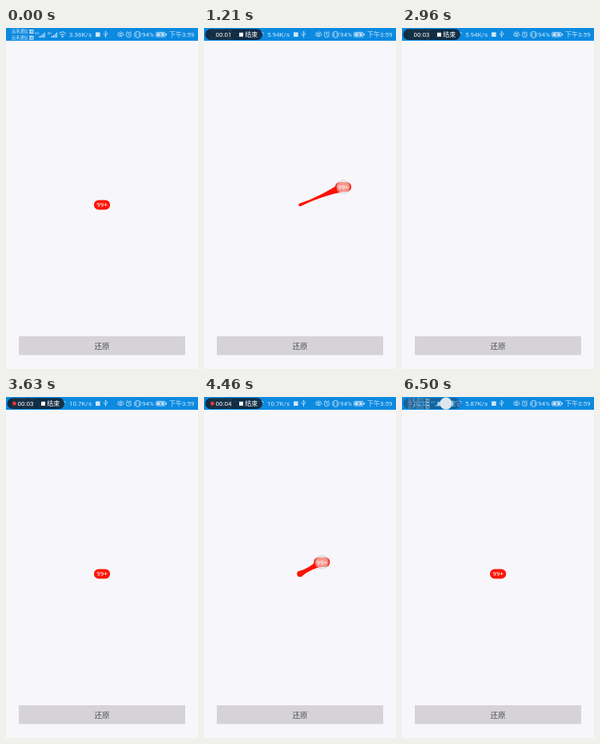
An HTML page for the animation above (6530 ms loop, 240 px wide and 427 px high).

```html
<!DOCTYPE html>
<html lang="zh-CN">
<head>
<meta charset="utf-8">
<title>Badge drag</title>
<style>
html, body { margin: 0; width: 100%; height: 100%; overflow: hidden; background: #f7f6fa; }
svg { display: block; width: 240px; height: 427px; }
text { font-family: Roboto, "Noto Sans CJK SC", "Noto Sans CJK", sans-serif; font-size: 8px; }
</style>
</head>
<body>
<svg viewBox="0 0 240 427" xmlns="http://www.w3.org/2000/svg">
  <defs>
    <radialGradient id="glow">
      <stop offset="0" stop-color="#fff" stop-opacity=".62"/>
      <stop offset=".72" stop-color="#f2f0f0" stop-opacity=".56"/>
      <stop offset=".88" stop-color="#d0cccc" stop-opacity=".6"/>
      <stop offset="1" stop-color="#a8a4a4" stop-opacity=".2"/>
    </radialGradient>
    <path id="bars" d="M0 8h1.2V6H0zM2 8h1.2V5H2zM4 8h1.2V3.5H4zM6 8h1.2V1.8H6z"/>
    <g id="hd">
      <rect width="5.6" height="5" rx=".8" fill="#cfe6f8"/>
      <text x="2.8" y="4" text-anchor="middle" fill="#0c8ae0" style="font-size:3.6px;font-weight:bold">HD</text>
    </g>
  </defs>
  <rect width="240" height="427" fill="#f7f6fa"/>
  <rect width="240" height="16" fill="#0c8ae0"/>

  <g fill="#cfe6f8">
    <text x="7" y="6.4" style="font-size:5.2px">远禾通信</text>
    <text x="7" y="14.2" style="font-size:5.2px">远禾通信</text>
    <use href="#hd" x="29" y="2"/>
    <use href="#hd" x="29" y="9.8"/>
    <text x="36" y="8" style="font-size:4.4px">4G</text>
    <use href="#bars" x="41.5" y="4"/>
    <text x="51.5" y="8" style="font-size:4.4px">4G</text>
    <use href="#bars" x="56.8" y="4"/>
    <g fill="none" stroke="#cfe6f8" stroke-width="1">
      <path d="M66.4 7Q70.6 2.8 74.8 7M68 9Q70.6 6.4 73.2 9"/>
    </g>
    <circle cx="70.6" cy="10.8" r="1.1"/>
    <text id="speed" x="79" y="11.3"></text>
    <rect x="112" y="5.4" width="5.6" height="5.6"/>
    <g fill="none" stroke="#cfe6f8" stroke-width=".8">
      <path d="M124.6 4.4V12M122.6 6.6V8.4L124.6 10M126.6 6V7.8L124.6 9.2M123.8 5.4l.8-1.4.8 1.4"/>
      <path d="M139 8.4Q143.2 3.6 147.4 8.4Q143.2 12.8 139 8.4zM140 5l1 1.2M143.2 3.8v1.2M146.4 5l-1 1.2"/>
      <circle cx="143.2" cy="8.4" r="1.2"/>
      <circle cx="153.4" cy="8.6" r="3"/>
      <path d="M153.4 6.6v2.2l1.4.8M150.2 5.8l1.7-1.5M156.6 5.8l-1.7-1.5"/>
      <rect x="162.4" y="4.6" width="4.2" height="7.4" rx=".5"/>
      <path d="M160.8 5.6v5.4M168.2 5.6v5.4"/>
      <rect x="187.6" y="5.4" width="11.4" height="5.6" rx="1"/>
    </g>
    <rect x="188.6" y="6.4" width="9" height="3.6"/>
    <rect x="199.6" y="7" width="1.3" height="2.4"/>
    <path d="M191 8.6l2.8-1.8-.4 1.3h2.2l-2.8 1.8.4-1.3z" fill="#0c8ae0"/>
    <text x="170" y="11.3">94%</text>
    <text x="204" y="11.3">下午3:59</text>
  </g>

  <g id="pill">
    <rect x="1.5" y="1.3" width="71.5" height="13.8" rx="6.9" fill="#10202f" fill-opacity=".87"/>
    <circle id="dot" cx="10.5" cy="8.2" r="2.4" fill="#f03a30"/>
    <g fill="#fff">
      <text id="clock" x="14.5" y="11.2"></text>
      <rect x="44" y="5.8" width="5" height="5"/>
      <text x="51.2" y="11.2">结束</text>
    </g>
  </g>

  <rect x="16" y="386" width="208" height="23.5" fill="#d5d3d6"/>
  <text x="120" y="401.6" text-anchor="middle" fill="#505050" style="font-size:9.5px">还原</text>

  <path id="tail" fill="#fd1402"/>
  <circle id="root" cx="120" cy="221.5" fill="#fd1402"/>
  <g id="badge">
    <rect x="-10" y="-6" width="20" height="12" rx="5.6" fill="#fd1402"/>
    <text y="2.9" text-anchor="middle" fill="#fff">99+</text>
  </g>
  <circle id="touch" fill="url(#glow)"/>
</svg>
<script>
const LOOP = 6530, HOME = [120, 221.5], SNAP = 1850, GONE = 2300, RESET = 3320, RELEASE = 4560;
const $ = id => document.getElementById(id);
const set = (id, attrs) => { for (const k in attrs) $(id).setAttribute(k, attrs[k]); };
const clamp = v => Math.max(0, Math.min(1, v));
const ramp = (t, a, b) => clamp((t - a) / (b - a));

// drag keys: time, x, y
const pull1 = [[560, 120, 221.5], [800, 137, 214.5], [1090, 166, 202.5], [1210, 174, 199],
  [1480, 177.5, 198], [1740, 179, 197.5], [1970, 182, 197], [2300, 183, 197]];
const pull2 = [[3720, 120, 221.5], [4010, 142, 209.5], [4240, 148, 206.5], [RELEASE, 147, 207]];

function follow(keys, t) {
  if (t <= keys[0][0]) return keys[0].slice(1);
  for (let i = 1; i < keys.length; i++) {
    const [a, x, y] = keys[i - 1], [b, u, v] = keys[i];
    if (t <= b) {
      const k = ramp(t, a, b);
      return [x + (u - x) * k, y + (v - y) * k];
    }
  }
  return keys[keys.length - 1].slice(1);
}

function badgeAt(t) {
  if (t < GONE) return follow(pull1, t);
  if (t < RELEASE) return follow(pull2, t);
  const k = ramp(t, RELEASE, 4900) - 1;
  const back = k * k * (4 * k + 3) + 1; // overshoot
  const from = follow(pull2, RELEASE);
  return from.map((v, i) => v + (HOME[i] - v) * back);
}

function touchAt(t) {
  const spans = [
    [470, 2380, badgeAt(Math.min(t, GONE - 1))],
    [3080, 3440, [143, 400]],
    [3640, RELEASE + 60, badgeAt(Math.min(t, RELEASE))],
    [5490, 5800, [144, 401]],
    [6430, LOOP + 200, [55, 8.2]]
  ];
  for (const [a, b, p] of spans) {
    if (t >= a && t < b) return { p, alpha: Math.min(ramp(t, a - 30, a + 30), ramp(b - t, 0, 60)) };
  }
  return { p: HOME, alpha: 0 };
}

function drawTail(x, y, show) {
  const dx = x - HOME[0], dy = y - HOME[1], d = Math.hypot(dx, dy);
  show = show && d > 1;
  const r = Math.max(1.4, 6 - d * .072), R = 6;
  set("root", { r: show ? r : 0 });
  if (!show) return set("tail", { d: "" });
  const nx = -dy / d, ny = dx / d;
  const at = (px, py, s) => (px + nx * s).toFixed(2) + " " + (py + ny * s).toFixed(2);
  const mid = at(HOME[0] + dx / 2, HOME[1] + dy / 2, 0);
  set("tail", { d: `M${at(...HOME, r)}Q${mid} ${at(x, y, R)}L${at(x, y, -R)}Q${mid} ${at(...HOME, -r)}Z` });
}

function draw(t) {
  const [x, y] = badgeAt(t);
  const held = t < SNAP || (t > RESET && t < 4900);
  set("badge", { transform: `translate(${x.toFixed(2)} ${y.toFixed(2)})`, opacity: t >= GONE && t < RESET ? 0 : 1 });
  drawTail(x, y, held);

  const { p, alpha } = touchAt(t);
  const onBar = t >= 6430;
  set("touch", { cx: p[0], cy: p[1], r: onBar ? 7.6 : 9, opacity: alpha });
  $("touch").setAttribute("fill", onBar ? "#dce6ee" : "url(#glow)");

  set("pill", { opacity: ramp(t, 19, 90) * (1 - .6 * ramp(t, 6430, 6500)) });
  const beat = t % 1000;
  set("dot", { opacity: beat >= 450 && beat < 960 ? 1 : 0 });
  $("clock").textContent = "00:0" + Math.floor((t + 50) / 1000);
  $("speed").textContent = (t < 90 ? "3.36" : t < 3140 ? "5.94" : t < 6140 ? "10.7" : "5.87") + "K/s";
}

const start = performance.now();
function tick() {
  draw((performance.now() - start) % LOOP);
  requestAnimationFrame(tick);
}
draw(0);
requestAnimationFrame(tick);
</script>
</body>
</html>
```
